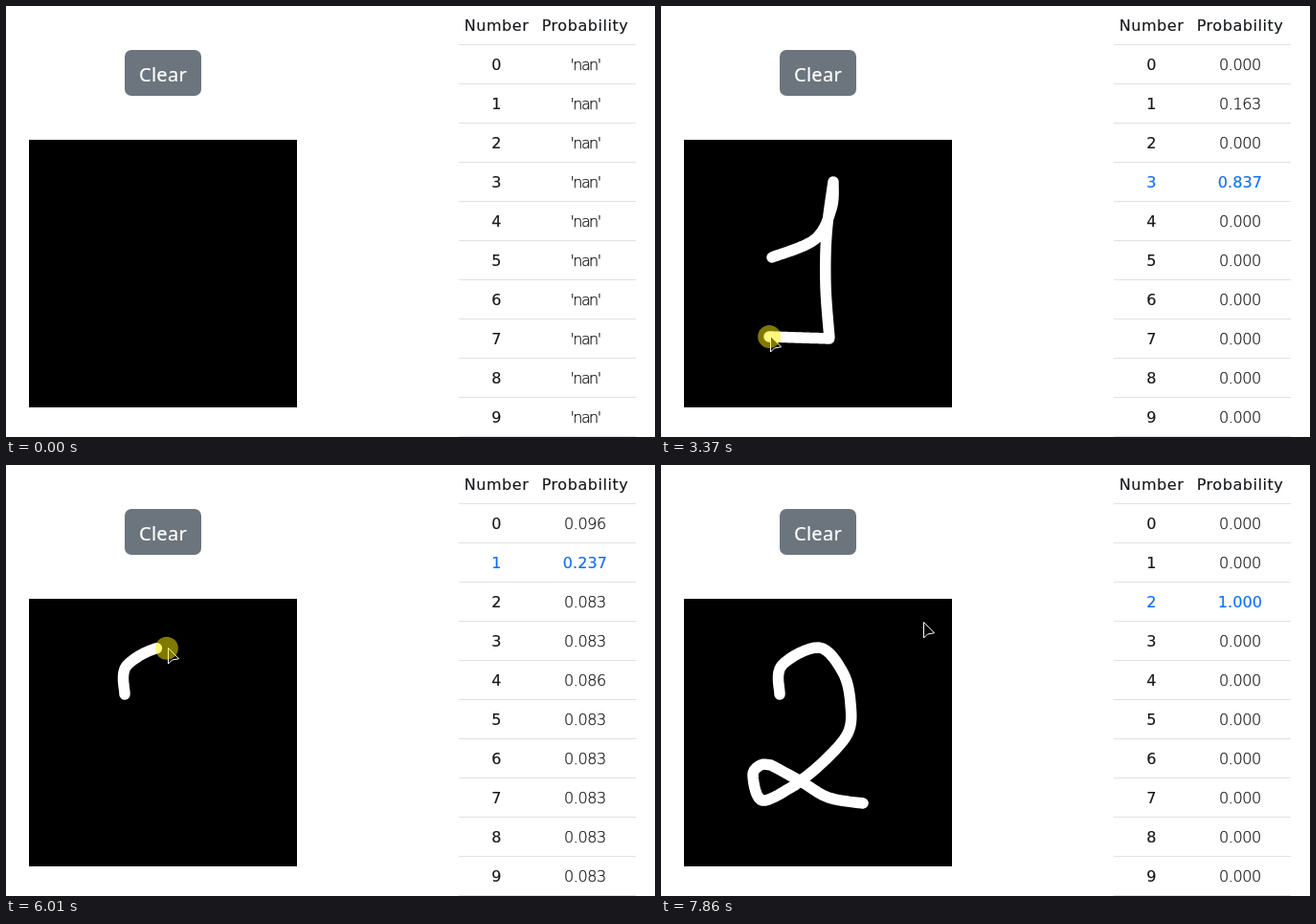
Animation, 678 px wide and 451 px high, one loop 8 s. Source, as an HTML page with a canvas:

```html
<!DOCTYPE html>
<html lang="en">
<head>
<meta charset="utf-8">
<title>Digit recognizer</title>
<style>
  html, body { margin: 0; width: 678px; height: 451px; overflow: hidden; background: #fff; }
  body { position: relative; color: #15181b; font: 16px/42px "DejaVu Sans", Verdana, sans-serif; }
  .clear {
    position: absolute; left: 124px; top: 46px; width: 80px; height: 48px;
    border-radius: 7px; background: #6c757d; color: #fff;
    font: 20px/51px "Noto Sans", Tahoma, sans-serif; text-align: center;
    letter-spacing: .3px; -webkit-text-stroke: .2px;
  }
  .clear.focus { background: #5c636a; box-shadow: 0 0 0 4px rgba(130, 138, 145, .5); }
  .pad { position: absolute; left: 24px; top: 140px; width: 280px; height: 280px; background: #000; }
  .table { position: absolute; left: 473px; top: 0; width: 185px; }
  .row { display: flex; height: 40px; border-bottom: 1px solid #dee2e6; white-space: nowrap; }
  .row span { width: 79px; text-align: center; letter-spacing: .55px; -webkit-text-stroke: .15px; }
  .row span + span { width: 106px; }
  .row .value { font-weight: 200; letter-spacing: -.4px; -webkit-text-stroke: .25px; }
  .row .nan { letter-spacing: -1.6px; }
  .row.best { color: #0d6efd; }
  .row.best .value { font-weight: 400; letter-spacing: .1px; -webkit-text-stroke: .15px; }
  canvas { position: absolute; left: 0; top: 0; }
</style>
</head>
<body>
<div class="clear">Clear</div>
<div class="pad"></div>
<div class="table"><div class="row"><span>Number</span><span>Probability</span></div></div>
<canvas width="678" height="451"></canvas>
<script>
const LOOP = 8000, CLEAR_AT = 4940, INK_LAG = 35;
const ctx = document.querySelector('canvas').getContext('2d');
const button = document.querySelector('.clear');
const table = document.querySelector('.table');

// Each move is a smooth curve through its points, evenly spaced in time
const moves = [
  { from: 500, to: 1090, points: [[11, 163], [70, 200], [126, 252], [116, 263]] },
  // digit one: hook, stem, base to the left, base to the right
  { from: 1470, to: 2055, points: [[116, 263], [161, 244], [178, 212], [180, 184]] },
  { from: 2060, to: 2800, points: [[180, 184], [173, 238], [172, 293], [176, 348]] },
  { from: 2800, to: 3250, points: [[176, 348], [113, 346]] },
  { from: 3370, to: 3660, points: [[113, 346], [211, 347]] },
  // to the button and back
  { from: 4110, to: 4860, points: [[211, 347], [317, 190], [177, 91], [158, 76]] },
  { from: 5020, to: 5730, points: [[158, 76], [178, 141], [124, 240]] },
  // digit two: bow, loop, foot
  { from: 5760, to: 6600, points: [[124, 240], [126, 210], [165, 191], [190, 217],
                                   [198, 250], [195, 281], [168, 312], [140, 335]] },
  { from: 6600, to: 7400, points: [[140, 335], [106, 351], [96, 325], [104, 314], [115, 314]] },
  { from: 7400, to: 7640, points: [[115, 314], [146, 331], [175, 348], [211, 354]] },
  { from: 7680, to: 7860, points: [[211, 354], [273, 165]] }
];
const strokes = [
  { from: 1470, to: 3660, until: CLEAR_AT },
  { from: 5760, to: 7640, until: LOOP }
];
const presses = [[1470, 3950], [4860, 5020], [5760, 7660]];

// Digits not listed share the remaining probability
const blank = { 0: .096, 1: .237, 4: .086 };
const readings = [
  { at: 1470, odds: blank },
  { at: 1860, odds: { 5: .998, 7: .001 } },
  { at: 2600, odds: { 1: .93, 7: .07 } },
  { at: 3370, odds: { 1: .163, 3: .837 } },
  { at: 3660, odds: { 1: .993, 3: .007 } },
  { at: CLEAR_AT, odds: null },
  { at: 5760, odds: blank },
  { at: 6010, odds: blank },
  { at: 6600, odds: { 2: .8524, 3: .1184, 7: .017, 9: .004 } },
  { at: 7400, odds: { 2: 1 } }
];

const rows = Array.from({ length: 10 }, (_, digit) => {
  const row = document.createElement('div');
  row.className = 'row';
  row.innerHTML = `<span>${digit}</span><span class="value"></span>`;
  table.append(row);
  return { row, value: row.lastChild };
});

const clamp01 = k => Math.min(Math.max(k, 0), 1);
const smooth = k => k * k * (3 - 2 * k);

function spline(a, b, c, d, k) {
  return b + k / 2 * (c - a + k * (2 * a - 5 * b + 4 * c - d + k * (3 * (b - c) + d - a)));
}

function position(t) {
  const { from, to, points } = moves.findLast(m => m.from <= t);
  const last = points.length - 1;
  const u = clamp01((t - from) / (to - from)) * last;
  const i = Math.min(Math.floor(u), last - 1);
  const at = j => points[Math.min(Math.max(j, 0), last)];
  return [0, 1].map(n => spline(at(i - 1)[n], at(i)[n], at(i + 1)[n], at(i + 2)[n], u - i));
}

function drawInk({ from, to }, t) {
  const end = Math.min(Math.max(t - INK_LAG, from), to);
  ctx.beginPath();
  for (let s = from; s < end; s += 15) ctx.lineTo(...position(s));
  ctx.lineTo(...position(end));
  ctx.lineTo(...position(end));
  ctx.strokeStyle = '#fff';
  ctx.lineWidth = 11.5;
  ctx.lineCap = ctx.lineJoin = 'round';
  ctx.stroke();
}

const arrow = new Path2D('M.5 .5V17L4.5 13L11.5 11.8Z');
const tail = new Path2D('M5 12L7.5 18');

function drawPointer(x, y, pressed) {
  ctx.save();
  ctx.translate(Math.round(x) + 1, Math.round(y) - 1);
  ctx.lineJoin = 'miter';
  ctx.lineCap = 'butt';
  ctx.strokeStyle = '#000';
  ctx.lineWidth = 2.5;
  ctx.stroke(tail);
  ctx.fillStyle = '#000';
  ctx.fill(arrow);
  ctx.strokeStyle = '#fff';
  ctx.lineWidth = 1;
  ctx.stroke(arrow);
  ctx.restore();
  if (!pressed) return;
  ctx.fillStyle = 'rgba(255, 242, 0, .5)';
  ctx.beginPath();
  ctx.arc(x, y, 12, 0, 7);
  ctx.fill();
}

function spread(odds) {
  const known = Object.values(odds);
  const rest = (1 - known.reduce((sum, p) => sum + p, 0)) / (10 - known.length);
  return rows.map((_, digit) => odds[digit] ?? rest);
}

function predict(t) {
  const i = readings.findLastIndex(r => r.at <= t);
  const now = readings[i], next = readings[i + 1];
  if (!now?.odds) return null;
  const a = spread(now.odds);
  if (!next?.odds) return a;
  const b = spread(next.odds);
  const k = smooth((t - now.at) / (next.at - now.at));
  return a.map((p, digit) => p + (b[digit] - p) * k);
}

function showTable(t) {
  const odds = predict(t);
  const best = odds ? odds.indexOf(Math.max(...odds)) : -1;
  rows.forEach(({ row, value }, digit) => {
    const text = odds ? Math.abs(odds[digit]).toFixed(3) : "'nan'";
    if (value.textContent !== text) value.textContent = text;
    value.classList.toggle('nan', !odds);
    row.classList.toggle('best', digit === best);
  });
}

function render(t) {
  ctx.clearRect(0, 0, 678, 451);
  showTable(t);
  button.classList.toggle('focus', t >= CLEAR_AT && t < 5760);
  const stroke = strokes.find(s => t >= s.from && t < s.until);
  if (stroke) drawInk(stroke, t);
  if (t >= moves[0].from) drawPointer(...position(t), presses.some(([from, to]) => t >= from && t < to));
}

const start = performance.now();
function tick() {
  render((performance.now() - start) % LOOP);
  requestAnimationFrame(tick);
}
tick();
</script>
</body>
</html>
```
